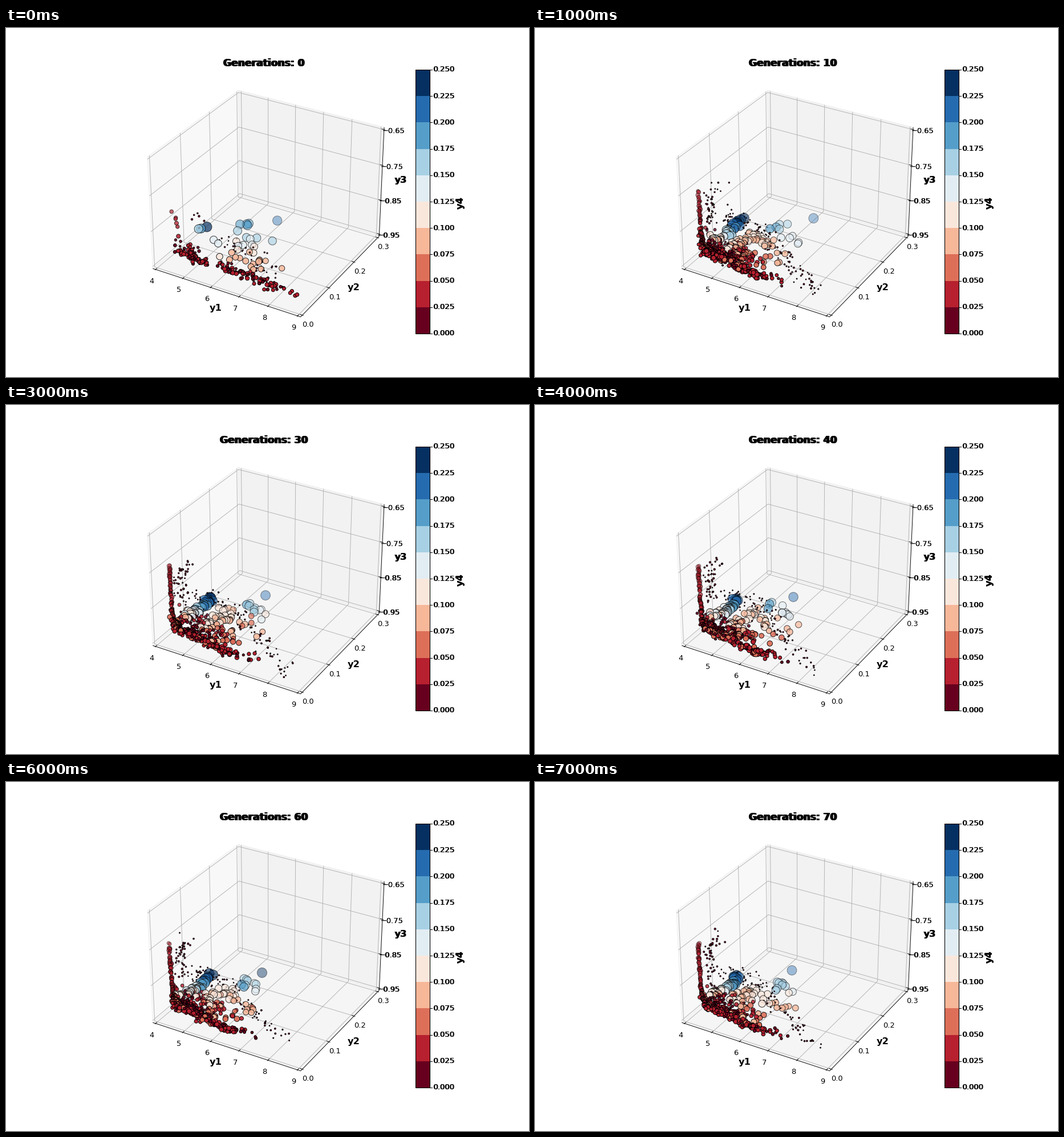
A matplotlib script that plays this animation: 917 px wide and 611 px high, repeating every 8 s.

```python
import numpy as np
import matplotlib
import matplotlib.pyplot as plt
from matplotlib.animation import FuncAnimation
from matplotlib.patches import Polygon, Rectangle

W, H, DPI = 917, 611, 64
PX = 72 / DPI                       # one pixel in points
LO, HI = -1 / 48, 1 + 1 / 48        # padded cube limits
plt.rcParams["font.family"] = "DejaVu Sans"

fig = plt.figure(figsize=(W / DPI, H / DPI), dpi=DPI, facecolor="white")
ax = fig.add_axes([0, 0, 1, 1])
ax.set(xlim=(0, W), ylim=(H, 0))
ax.axis("off")
cmap = matplotlib.colormaps["RdBu"].resampled(10)


def project(x, y, z):
    """Perspective view of the unit cube (elevation 30, azimuth -60)."""
    x, y, z = (x - .5) * 1.14288, (y - .5) * 1.14288, (z - .5) * .85716
    depth = 10 - (.433 * x - .75 * y + .5 * z)
    right = .866 * x + .5 * y
    up = -.25 * x + .433 * y + .866 * z
    return 459.5 + 2495 * right / depth, 297.9 - 2495 * up / depth


def line(points, color, width=.9, zorder=2):
    xs, ys = zip(*(project(*p) for p in points))
    ax.plot(xs, ys, color=color, lw=width * PX, zorder=zorder,
            solid_capstyle="butt")


def label(x, y, text, size, copies=(0,), **kw):
    kw = {"ha": "center", "va": "center", **kw}
    return [ax.text(x + dx, y, text, fontsize=size * PX, zorder=6, **kw)
            for dx in copies]


def draw_cube():
    left = [(LO, LO, LO), (LO, HI, LO), (LO, HI, HI), (LO, LO, HI)]
    back = [(LO, HI, LO), (HI, HI, LO), (HI, HI, HI), (LO, HI, HI)]
    floor = [(LO, LO, LO), (HI, LO, LO), (HI, HI, LO), (LO, HI, LO)]
    for pane, color in ((left, "#f8f8f8"), (back, "#f2f2f2"), (floor, "#f5f5f5")):
        ax.add_patch(Polygon([project(*p) for p in pane], fc=color,
                             ec="#eeeeee", lw=.8 * PX, zorder=1))

    inner, outer = 1 / 60, 1 / 120
    for i in range(6):
        t = i / 5
        line([(t, LO, LO), (t, HI, LO), (t, HI, HI)], "#b0b0b0")
        line([(t, LO + inner, LO), (t, LO - outer, LO)], "black", zorder=3)
        x, y = project(t, LO, LO)
        label(x - 6.5, y + 20.5, str(4 + i), 13)
    for i in range(4):
        t = i / 3
        line([(HI, t, LO), (LO, t, LO), (LO, t, HI)], "#b0b0b0")
        line([(LO, LO, t), (LO, HI, t), (HI, HI, t)], "#b0b0b0")
        line([(HI - inner, t, LO), (HI + outer, t, LO)], "black", zorder=3)
        line([(HI - inner, HI, t), (HI + outer, HI, t)], "black", zorder=3)
        x, y = project(HI, t, LO)
        label(x + 10, y + 16.8, f"{i / 10:.1f}", 13)
        x, y = project(HI, HI, t)
        label(x + 36.5, y + 2.5, f"\u22120.{95 - 10 * i}", 13, (-.4, .4), ha="right")
    line([(LO, LO, LO), (HI, LO, LO), (HI, HI, LO), (HI, HI, HI)], "black", zorder=3)
    label(368, 491, "y1", 16.2, weight="bold")
    label(610, 455, "y2", 16.2, weight="bold")
    label(692, 266, "y3", 16.2, (-.6, .6), weight="bold")


def draw_colorbar():
    x, width, bottom, step = 718.2, 24.3, 535, 46.2
    for i in range(10):
        ax.add_patch(Rectangle((x, bottom - (i + 1) * step), width, step,
                               fc=cmap(i), ec="none", zorder=2))
    ax.add_patch(Rectangle((x, bottom - 10 * step), width, 10 * step, fc="none",
                           ec="black", lw=1.1 * PX, zorder=4))
    for i in range(11):
        y = bottom - i * step
        ax.plot([x + width, x + width + 4], [y, y], color="black", lw=PX)
        label(749, y, f"{i * .025:.3f}", 13.2, (-.7, .3), ha="left")
    label(797, 306, "y4", 16.2, (-.6, .6), weight="bold", rotation=90)


def trail(rng, n, path, spread, v0, v1, graded=False):
    """Scatter n bubbles (x, y, value) around a polyline on screen."""
    t = rng.random(n)
    knots = np.linspace(0, 1, len(path))
    px, py = np.array(path).T
    x = np.interp(t, knots, px) + rng.normal(0, spread, n)
    y = np.interp(t, knots, py) + rng.normal(0, spread, n)
    v = v0 + (v1 - v0) * (t if graded else rng.random(n))
    return np.column_stack([x, y, v])


def first_swarm(rng):
    return [
        # front edge of the floor
        trail(rng, 55, [(301, 391), (325, 399), (350, 411)], 3.5, .008, .042),
        trail(rng, 85, [(375, 414), (420, 432), (480, 456)], 4, .006, .045),
        trail(rng, 20, [(303, 378), (335, 390)], 6, .008, .04),
        trail(rng, 6, [(293, 322), (302, 367)], 2, .028, .04),
        trail(rng, 6, [(480, 453), (520, 470)], 2, .02, .035),
        # pale middle and blue back
        trail(rng, 16, [(374, 392), (430, 410), (480, 424)], 6, .075, .105),
        trail(rng, 9, [(364, 372), (435, 385)], 7, .1, .14),
        trail(rng, 4, [(386, 360), (468, 375)], 2, .14, .165),
        trail(rng, 3, [(322, 357), (354, 347)], 1, .12, .24, True),
        trail(rng, 6, [(392, 352), (423, 344), (488, 333)], 2, .16, .21, True),
        # specks
        trail(rng, 45, [(370, 360), (405, 385), (440, 400), (468, 432)], 10, .002, .006),
        trail(rng, 6, [(310, 305), (354, 350)], 5, .003, .01),
    ]


def later_swarm(rng, gen):
    early = 10 / gen                # the first swarms reach further out
    k = .85 + .4 * early
    return [
        # steep column bending into the front edge
        trail(rng, 60, [(286.5, 281), (288, 315), (291, 355), (294, 380)], .9, .025, .045),
        trail(rng, int(130 * k), [(294, 376), (300, 393), (345, 412), (388, 434)],
              2.8, .012, .058),
        trail(rng, int(125 * k), [(300, 384), (325, 395), (360, 412)], 6, .006, .035),
        trail(rng, int(55 * k), [(300, 364), (330, 378), (370, 398)], 8, .006, .035),
        trail(rng, int(32 * k), [(365, 418), (390, 432), (408, 437)], 3.2, .012, .05),
        trail(rng, 8, [(410, 432), (440, 448)], 4, .012, .035),
        # pale middle
        trail(rng, int(34 * k), [(350, 390), (372, 400), (400, 408)], 8, .03, .085),
        trail(rng, int(36 * k), [(345, 386), (366, 372), (385, 366), (410, 380)],
              6, .08, .125),
        trail(rng, 14, [(308, 372), (330, 362)], 4, .09, .14),
        trail(rng, 7, [(410, 390), (440, 395)], 8 + 6 * early, .07, .1),
        # blue ridge and the loose bubbles behind it
        trail(rng, rng.integers(20, 34), [(330, 364), (345, 354), (359, 336)],
              3.2, .13, .24, True),
        trail(rng, 10, [(412, 350), (436, 357), (450, 376)], 4 + 4 * early, .18, .12, True),
        trail(rng, 1, [(440 + 48 * early, 333)], 2, .21, .23),
        # specks
        trail(rng, 45, [(322, 272), (303, 295), (309, 318), (308, 345)], 6, .002, .009),
        trail(rng, int(62 * k), [(330, 335), (370, 342), (418, 366)], 8, .002, .005),
        trail(rng, int(50 * k), [(405, 375), (436, 400), (462, 430), (494, 461)],
              7, .002, .007),
    ]


def swarm(gen):
    rng = np.random.default_rng(100 + gen)
    return np.vstack(later_swarm(rng, gen) if gen else first_swarm(rng))


draw_cube()
draw_colorbar()
title = label(452.3, 62, "", 17.1, (-.6, .6), weight="bold")
dots = ax.scatter([], [], linewidths=.95 * PX, zorder=5)


def update(i):
    gen = 10 * i
    x, y, v = swarm(gen).T
    # far bubbles fade, specks stay dark
    alpha = np.clip(.35 + .005 * (y - 328) - .0018 * (x - 488), .33, 1)
    order = np.argsort(alpha)
    alpha = np.where(v < .01, np.maximum(alpha, .92), alpha)
    x, y, v, alpha = (a[order] for a in (x, y, v, alpha))
    face = cmap(v / .25)
    face[:, 3] = alpha
    edge = np.zeros_like(face)
    edge[:, 3] = alpha
    dots.set_offsets(np.column_stack([x, y]))
    dots.set_sizes((17.5 * PX) ** 2 * v / .24)
    dots.set_facecolors(face)
    dots.set_edgecolors(edge)
    for text in title:
        text.set_text(f"Generations: {gen}")
    return [dots, *title]


anim = FuncAnimation(fig, update, frames=8, interval=1000, repeat=True,
                     repeat_delay=0, blit=False)
plt.show()
```
